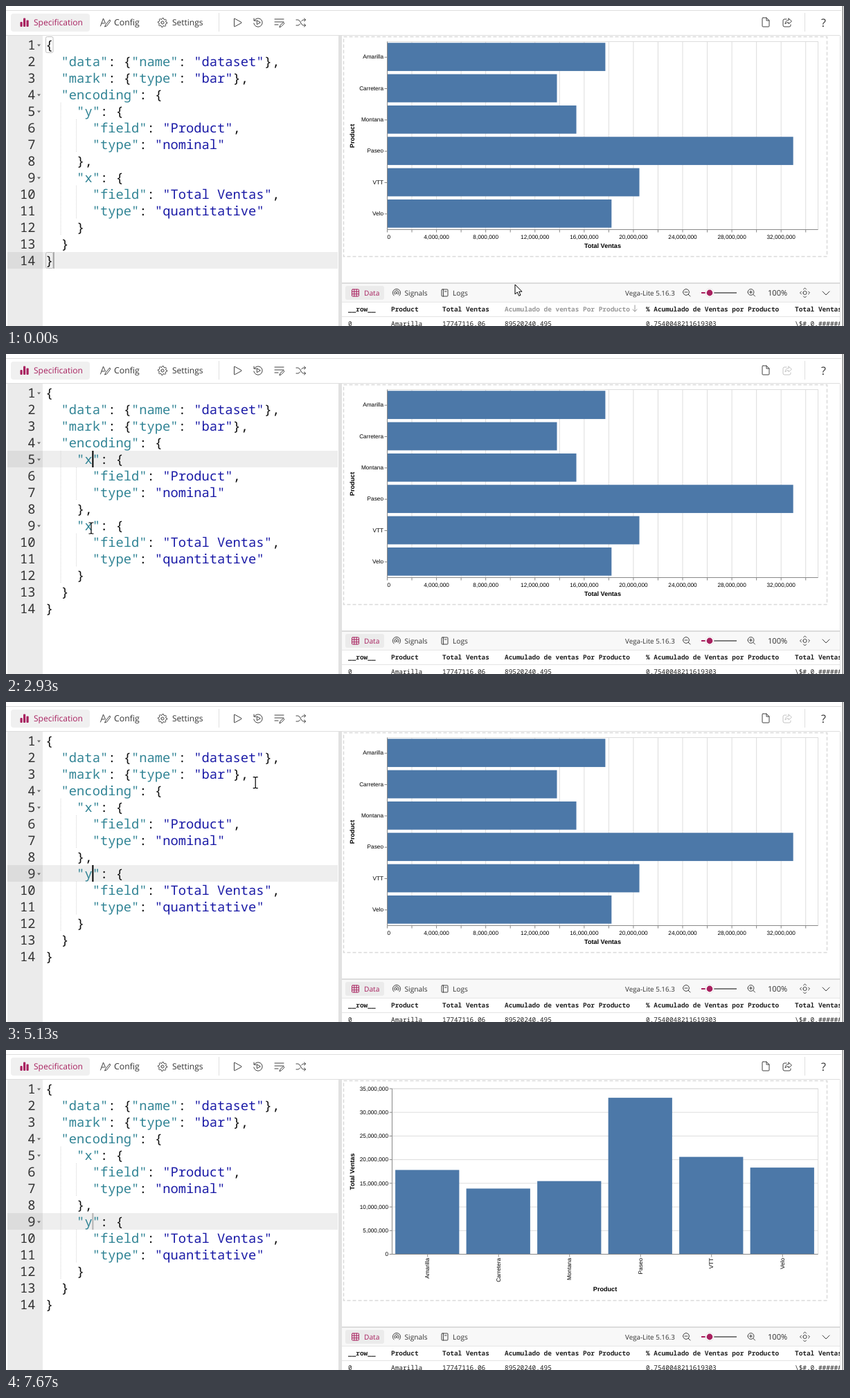
An HTML page for the animation above (7.87 s loop, 1210 px wide and 463 px high).

```html
<!DOCTYPE html>
<html lang="es">
<head>
<meta charset="utf-8">
<title>Bar chart specification</title>
<style>
  html, body { margin: 0; width: 100%; height: 100%; overflow: hidden; background: #fff; }
  svg { display: block; width: 1210px; height: 463px; }
  text { white-space: pre; text-rendering: geometricPrecision; }
  .code { font: 18.8px "Noto Sans Mono", "DejaVu Sans Mono", monospace; fill: #111; }
  .key { fill: #318495; }
  .str { fill: #1a1aa6; }
  .num { fill: #333; text-anchor: end; }
  .ui { font: 12px "Open Sans", "Noto Sans", sans-serif; fill: #333; }
  .tab { font-size: 10.2px; }
  .cell { font: 9.43px "Noto Sans Mono", monospace; fill: #222; }
  .head { font-weight: 700; }
  .label { font: 8.26px "Liberation Sans", Arial, sans-serif; fill: #000; }
  .title { font: bold 9.1px "Liberation Sans", Arial, sans-serif; fill: #000; text-anchor: middle; }
  .icon { fill: none; stroke: #424242; stroke-width: 1; stroke-linecap: round; stroke-linejoin: round; }
  .accent { stroke: #a8215f; }
</style>
</head>
<body>
<svg id="stage" viewBox="0 0 1210 463"></svg>
<script>
const LOOP = 7870, TICK = 1000 / 15;
const ADV = 11.28, LEFT = 57, ROW = 24, TOP = 44;
const ACCENT = '#a8215f';

const rect = (x, y, w, h, fill, more = '') =>
  `<rect x="${x}" y="${y}" width="${w}" height="${h}" fill="${fill}" ${more}/>`;
const text = (x, y, cls, s, more = '') => `<text x="${x}" y="${y}" class="${cls}" ${more}>${s}</text>`;
const line = (x1, y1, x2, y2, stroke, more = '') =>
  `<line x1="${x1}" y1="${y1}" x2="${x2}" y2="${y2}" stroke="${stroke}" ${more}/>`;
const icon = (x, y, d, more = '', cls = '') =>
  `<path class="icon ${cls}" transform="translate(${x} ${y})" d="${d}" ${more}/>`;
const group = (id, body, more = '') => `<g id="${id}" ${more}>${body}</g>`;
const rowTop = n => TOP + (n - 1) * ROW;
const colX = c => LEFT + c * ADV;
const ring = (x, y, r) => `M${x - r} ${y}a${r} ${r} 0 1 0 ${2 * r} 0a${r} ${r} 0 1 0 ${-2 * r} 0`;

// ---- editor ----
const SOURCE = `{
  "data": {"name": "dataset"},
  "mark": {"type": "bar"},
  "encoding": {
    "y": {
      "field": "Product",
      "type": "nominal"
    },
    "x": {
      "field": "Total Ventas",
      "type": "quantitative"
    }
  }
}`.split('\n');

function codeLine(src, i) {
  const n = i + 1, y = rowTop(n) + 19, body = src.trimStart(), indent = src.length - body.length;
  const spans = body.replace(/"([^"]*)"(:?)/g, (_, word, colon) => {
    const id = word.length === 1 ? ` id="key${n}"` : '';
    return `<tspan class="${colon ? 'key' : 'str'}">"<tspan${id}>${word}</tspan>"</tspan>${colon}`;
  });
  return text(42.5, y, 'code num', n) + text(colX(indent), y, 'code', spans);
}

function editor() {
  const guide = (col, from, to) =>
    line(colX(col) - .5, rowTop(from), colX(col) - .5, rowTop(to + 1), '#d2d2d2', 'stroke-dasharray="1 1"');
  const folds = [1, 4, 5, 9].map(n =>
    `<path d="M45 ${rowTop(n) + 11.5}h5l-2.5 3z" fill="#666"/>`).join('');
  const bracket = n =>
    rect(57.5, rowTop(n) + .5, 10.5, 23, 'none', 'stroke="#c0c0c0" rx="2"');
  return rect(0, 43, 480, 420, '#fff') + rect(2, 43, 51, 420, '#ebebeb') +
    group('active', rect(2, 0, 51, ROW, '#dcdcdc') + rect(53, 0, 426, ROW, '#eeeeee')) +
    rect(colX(5), 0, ADV, ROW, '#b5d5ff', 'id="selection"') +
    guide(2, 5, 12) + guide(4, 6, 7) + guide(4, 10, 11) +
    group('brackets', bracket(1) + bracket(14)) +
    SOURCE.map(codeLine).join('') + folds +
    rect(0, 0, 2, ROW, '#000', 'id="caret"') +
    group('popup',
      rect(112, 264, 259, 31, '#000', 'opacity=".2" style="filter:blur(2px)"') +
      rect(109.5, 261.5, 259, 30, '#c9d6fb', 'stroke="#d3d3d3"') +
      text(113, 283, 'code', 't<tspan fill="#2d69c7">y</tspan>pe') +
      text(177, 283, 'code', 'local', 'style="fill:#7d8292"'));
}

// ---- charts ----
const DATA = [['Amarilla', 17.747], ['Carretera', 13.815], ['Montana', 15.391],
  ['Paseo', 33.011], ['VTT', 20.512], ['Velo', 18.25]];
const BAR = '#4c78a8', GRID = '#ddd', AXIS = '#888', MAX = 35;
const amount = v => v ? v + ',000,000' : '0';
// bars sit on whole pixels, rules on half pixels
const bar = (x, y, w, h) => rect(x - .5, y - .5, w, h, BAR);

function barsAcross() {
  const x0 = 550.5, x1 = 1172.5, y0 = 51.5, y1 = 323.5, step = (y1 - y0) / 6;
  const px = v => x0 + v / MAX * (x1 - x0);
  let s = rect(x0, y0, x1 - x0, y1 - y0, 'none', `stroke="${GRID}"`);
  for (let v = 0; v < MAX; v += 2) {
    s += line(px(v), y0, px(v), y1, GRID) + line(px(v), y1, px(v), y1 + 4, AXIS);
    if (v % 4 === 0) s += text(px(v), 337, 'label', amount(v), v ? 'text-anchor="middle"' : '');
  }
  DATA.forEach(([name, v], i) => {
    const y = y0 + i * step, mid = y + step / 2;
    s += bar(x0, y + step * .05, px(v) - x0, step * .9) +
      line(x0 - 4, mid, x0, mid, AXIS) + text(545, mid + 2, 'label', name, 'text-anchor="end"');
  });
  return s + line(x0, y0, x0, y1, AXIS) + line(x0, y1, x1, y1, AXIS) +
    text(861.5, 349.5, 'title', 'Total Ventas') +
    text(0, 0, 'title', 'Product', 'transform="translate(503 188) rotate(-90)"');
}

function barsUp() {
  const x0 = 557.5, x1 = 1172.5, y0 = 56, y1 = 295.5, step = (x1 - x0) / 6;
  const py = v => y1 - v / MAX * (y1 - y0);
  let s = rect(x0, y0, x1 - x0, y1 - y0, 'none', `stroke="${GRID}"`);
  for (let v = 0; v <= MAX; v += 5) {
    s += line(x0, py(v), x1, py(v), GRID) + line(x0 - 4, py(v), x0, py(v), AXIS) +
      text(552, py(v) + 2.8, 'label', amount(v), 'text-anchor="end"');
  }
  DATA.forEach(([name, v], i) => {
    const x = x0 + i * step, mid = x + step / 2;
    s += bar(x + step * .05, py(v), step * .9, y1 - py(v)) +
      line(mid, y1, mid, y1 + 4, AXIS) +
      text(0, 0, 'label', name, `text-anchor="end" transform="translate(${mid + 2.5} 301) rotate(-90)"`);
  });
  return s + line(x0, y0, x0, y1, AXIS) + line(x0, y1, x1, y1, AXIS) +
    text(865, 349, 'title', 'Product') +
    text(0, 0, 'title', 'Total Ventas', 'transform="translate(503 176) rotate(-90)"');
}

// ---- toolbars and table ----
function toolbar() {
  const gear = Array.from({ length: 33 }, (_, i) => {
    const a = i * Math.PI / 16, r = i % 4 < 2 ? 6.6 : 5;
    return `${i ? 'L' : 'M'}${(r * Math.cos(a)).toFixed(2)} ${(r * Math.sin(a)).toFixed(2)}`;
  }).join('') + ring(0, 0, 2.1);
  return rect(0, 0, 1206, 42, '#fff') + line(0, 6.5, 1206, 6.5, '#dedede') + line(0, 42.5, 1206, 42.5, '#dedede') +
    rect(7, 11, 114, 26, '#f0f0f0', 'rx="4"') +
    rect(20.5, 23, 3.2, 7, ACCENT, 'rx="1"') + rect(25, 17.5, 3.2, 12.5, ACCENT, 'rx="1"') +
    rect(29.5, 20.5, 3.2, 9.5, ACCENT, 'rx="1"') +
    text(40, 28, 'ui', 'Specification', `style="fill:${ACCENT}"`) +
    icon(136.5, 17, 'M0 12L4 1L7 8M1.7 8h4M13 3.2L7.5 10L6 13L9 11.8L14 5.2Q14.5 3 13 3.2') +
    text(156, 28, 'ui', 'Config', 'style="font-size:12.3px"') +
    icon(226, 24, gear) + text(240, 28, 'ui', 'Settings') +
    line(307.5, 10, 307.5, 37, '#e0e0e0') + line(1153.5, 10, 1153.5, 37, '#e0e0e0') +
    rect(320, 11, 27, 26, '#f3f3f3', 'rx="4" id="playHover"') +
    icon(329, 18, 'M.5 .5V11.5Q.5 12.2 1.2 11.8L11 6.5Q11.6 6 11 5.6L1.2 .2Q.5 0 .5 .5z', 'id="play"') +
    icon(364, 24, 'M-5.5 -3A6.2 6.2 0 1 1 -6.2 1M-6 -6V-2.8H-2.8M-1.7 -2.8V2.8L3 0z') +
    icon(388, 18, 'M0 1H13M0 5H13M0 9H5M7 12.5L8 9.8L12.5 5.8L14 7.2L9.7 11.5z') +
    icon(419, 18, 'M0 2H2.5Q4.5 2 6 5L7 7Q8.5 10 10.5 10H13.5M0 10H2.5Q4.5 10 5.5 8M7.7 4Q8.8 2 10.5 2H13.5M11.5 0L13.7 2L11.5 4M11.5 8L13.7 10L11.5 12') +
    icon(1092, 17, 'M1 0H6L10 4V12Q10 13 9 13H1Q0 13 0 12V1Q0 0 1 0M6 0V4H10') +
    icon(1122, 18, 'M5 1H2Q0 1 0 3V10Q0 12 2 12H9Q11 12 11 10V9M8 0L12.5 4L8 8V5.7Q5 5.5 3 8Q3.5 2.7 8 2.3z', 'id="share"') +
    text(1177, 29.5, 'ui', '?', 'style="font-size:16px"');
}

function panel() {
  const lens = 'M3.2 3.2L6 6' + ring(0, 0, 4.4);
  const heads = [[494, '__row__'], [556, 'Product'], [630, 'Total Ventas'],
    [720, 'Acumulado de ventas Por Producto', 'id="sorted"'],
    [924, '% Acumulado de Ventas por Producto'], [1139, 'Total Ventas']];
  const cells = [[494, '0'], [556, 'Amarilla'], [630, '17747116.06'], [720, '89520240.495'],
    [924, '0.7540048211619303'], [1139, '\\$#,0.#######']];
  return rect(485, 400, 719, 2, '#dcdcdc') + rect(485, 402, 719, 26, '#f8f8f8') +
    rect(490, 405, 56, 20, '#ebebeb', 'rx="3"') +
    icon(499.5, 410, 'M1 0H9Q10 0 10 1V9Q10 10 9 10H1Q0 10 0 9V1Q0 0 1 0M0 3.3H10M0 6.7H10M3.3 0V10M6.7 0V10', '', 'accent') +
    text(517, 419, 'ui tab', 'Data', `style="fill:${ACCENT}"`) +
    icon(564, 415, 'M-4 4A5.6 5.6 0 1 1 4 4M-2.2 2.4A3.2 3.2 0 1 1 2.2 2.4' + ring(0, .3, 1)) +
    text(575.5, 419, 'ui tab', 'Signals') +
    icon(629, 410, 'M1 0H8Q9 0 9 1V9Q9 10 8 10H1Q0 10 0 9V1Q0 0 1 0M2.5 0V10M4.5 3H7') +
    text(645, 419, 'ui tab', 'Logs') + text(894, 419, 'ui tab', 'Vega-Lite 5.16.3', 'style="font-size:9.8px"') +
    icon(982, 414, lens + 'M-2 0H2') + icon(1075.5, 414, lens + 'M-2 0H2M0 -2V2') +
    line(1004, 415, 1016, 415, ACCENT, 'stroke-width="2"') + line(1016, 415, 1055, 415, '#555', 'stroke-width="1.6"') +
    `<circle cx="1016" cy="415" r="6.2" fill="#fff" stroke="#d5d5d5" stroke-width=".6"/>` +
    `<circle cx="1016" cy="415" r="4.4" fill="${ACCENT}"/>` +
    text(1100, 419, 'ui', '100%', 'style="font-size:11.1px"') +
    icon(1153.5, 415, 'M-2 -5L0 -7L2 -5M-2 5L0 7L2 5M-5 -2L-7 0L-5 2M5 -2L7 0L5 2' + ring(0, 0, 2.6)) +
    icon(1179, 413, 'M0 0L5 5L10 0') +
    rect(485, 428, 719, 35, '#fff') + line(485, 428.5, 1204, 428.5, '#e6e6e6') +
    line(485, 449.5, 1204, 449.5, '#e3e3e3') +
    heads.map(([x, s, m]) => text(x, 441.5, 'cell head', s, m)).join('') +
    cells.map(([x, s]) => text(x, 463, 'cell', s)).join('') +
    icon(908, 433, 'M0 0V9M-3 6L0 9L3 6', 'id="sortArrow" style="stroke:#999"');
}

const pointers =
  group('arrow', '<path d="M0 0V14L3.3 11L5.6 16.3L8 15.3L5.7 10.2H10z" fill="#fff" stroke="#000" stroke-linejoin="round"/>') +
  group('beam', '<path d="M-3.5 -8H-1L0 -7L1 -8H3.5M0 -7V7M-3.5 8H-1L0 7L1 8H3.5" fill="none" stroke="#000" stroke-width="1.2"/>') +
  group('hand', '<path d="M-1.5 1Q0 -1 1.5 1V7Q3.5 5.8 4.3 7.4Q6 6.3 6.9 8Q9 7.4 9 9.5V13Q8.8 15 7.5 16.5V18.5H-1V16.5L-5 11.5Q-5.5 9.3 -3.4 10L-1.5 12zM1.5 7V10M4.3 7.4V10.3M6.9 8V10.6" fill="#fff" stroke="#000" stroke-linejoin="round"/>');

document.getElementById('stage').innerHTML =
  rect(0, 0, 1210, 463, '#fff') + editor() + rect(480, 43, 5, 420, '#e1e1e1') +
  rect(487.5, 44.5, 698, 318, 'none', 'stroke="#d9d9d9" stroke-width="1.5" stroke-dasharray="5 3"') +
  group('across', barsAcross()) + group('up', barsUp()) + panel() + toolbar() +
  rect(1204, 7, 6, 456, '#fff') + line(1204.5, 43, 1204.5, 463, '#e1e1e1') +
  rect(1207.5, 0, 1.5, 463, '#8a8a8a') + pointers;

// ---- motion ----
const $ = {};
document.querySelectorAll('[id]').forEach(el => $[el.id] = el);

// time, x, y, pointer shape from then on
const PATH = [
  [0, 735, 403, 'arrow'], [420, 450, 285, 'beam'], [800, 131, 161, 'beam'], [930, 127, 160, 'beam'],
  [1330, 112, 153, 'arrow'], [2070, 112, 153, 'beam'], [2800, 124, 250, 'beam'], [2930, 123, 252, 'beam'],
  [3270, 114, 249, 'arrow'], [4130, 114, 249, 'beam'], [4730, 190, 205, 'beam'], [5270, 392, 100, 'beam'],
  [5530, 266, 34, 'arrow'], [5600, 331, 27, 'hand'], [6000, 331, 27, 'hand'], [6130, 370, 42, 'arrow'],
  [6400, 718, 206, 'arrow'], [6740, 480, 315, 'beam'], [7330, 57, 476, 'beam'], [LOOP, 57, 476, 'beam']];

// time, active row, caret column, caret opacity, selection row
const EDIT = [
  [0, 14, 1, .25, 0], [530, 14, 1, 0, 0], [930, 5, 6, 1, 0], [1130, 5, 5, 1, 5], [1860, 5, 5, 0, 5],
  [2130, 5, 6, 1, 0], [3000, 9, 6, 1, 0], [3130, 9, 5, 1, 9], [3660, 9, 5, .4, 9], [3725, 9, 5, 0, 9],
  [3990, 9, 6, 1, 0], [4530, 9, 6, 0, 0], [5000, 9, 6, 1, 0], [6060, 9, 6, 0, 0],
  [6660, 9, 6, 1, 0], [7190, 9, 6, 0, 0], [7660, 9, 6, .25, 0]];

const lastBefore = (table, t) => table.findLastIndex(row => row[0] <= t);
const show = (el, on) => el.style.display = on ? '' : 'none';

function pointerAt(t) {
  const i = lastBefore(PATH, t), a = PATH[i], b = PATH[i + 1] || a;
  const u = Math.min(1, (t - a[0]) / (b[0] - a[0] || 1)), e = u * u * (3 - 2 * u);
  return { x: a[1] + (b[1] - a[1]) * e, y: a[2] + (b[2] - a[2]) * e, kind: a[3] };
}

function draw(now) {
  const t = Math.floor((now % LOOP + 4) / TICK) * TICK + 1;
  const p = pointerAt(t);
  for (const kind of ['arrow', 'beam', 'hand']) show($[kind], kind === p.kind);
  $[p.kind].setAttribute('transform', `translate(${p.x.toFixed(1)} ${p.y.toFixed(1)})`);

  const [, row, col, opacity, selected] = EDIT[lastBefore(EDIT, t)];
  $.active.setAttribute('transform', `translate(0 ${rowTop(row)})`);
  $.caret.setAttribute('x', colX(col) - .3);
  $.caret.setAttribute('y', rowTop(row));
  $.caret.setAttribute('opacity', opacity);
  show($.selection, selected);
  if (selected) $.selection.setAttribute('y', rowTop(selected));
  show($.brackets, row === 14);
  $.key5.textContent = t < 2130 ? 'y' : 'x';
  $.key9.textContent = t < 3990 ? 'x' : 'y';
  show($.popup, t >= 3990 && t < 4790);

  const hover = t < 66, ran = t >= 5730, onPlay = p.kind === 'hand';
  $.sorted.style.fill = hover ? '#999' : '';
  show($.sortArrow, hover);
  show($.playHover, onPlay);
  $.play.style.stroke = onPlay ? ACCENT : '';
  $.share.style.stroke = t >= 2130 && !ran ? '#c4c4c4' : '';
  show($.across, !ran);
  show($.up, ran);
}

function loop() {
  draw(performance.now());
  requestAnimationFrame(loop);
}
loop();
</script>
</body>
</html>
```
